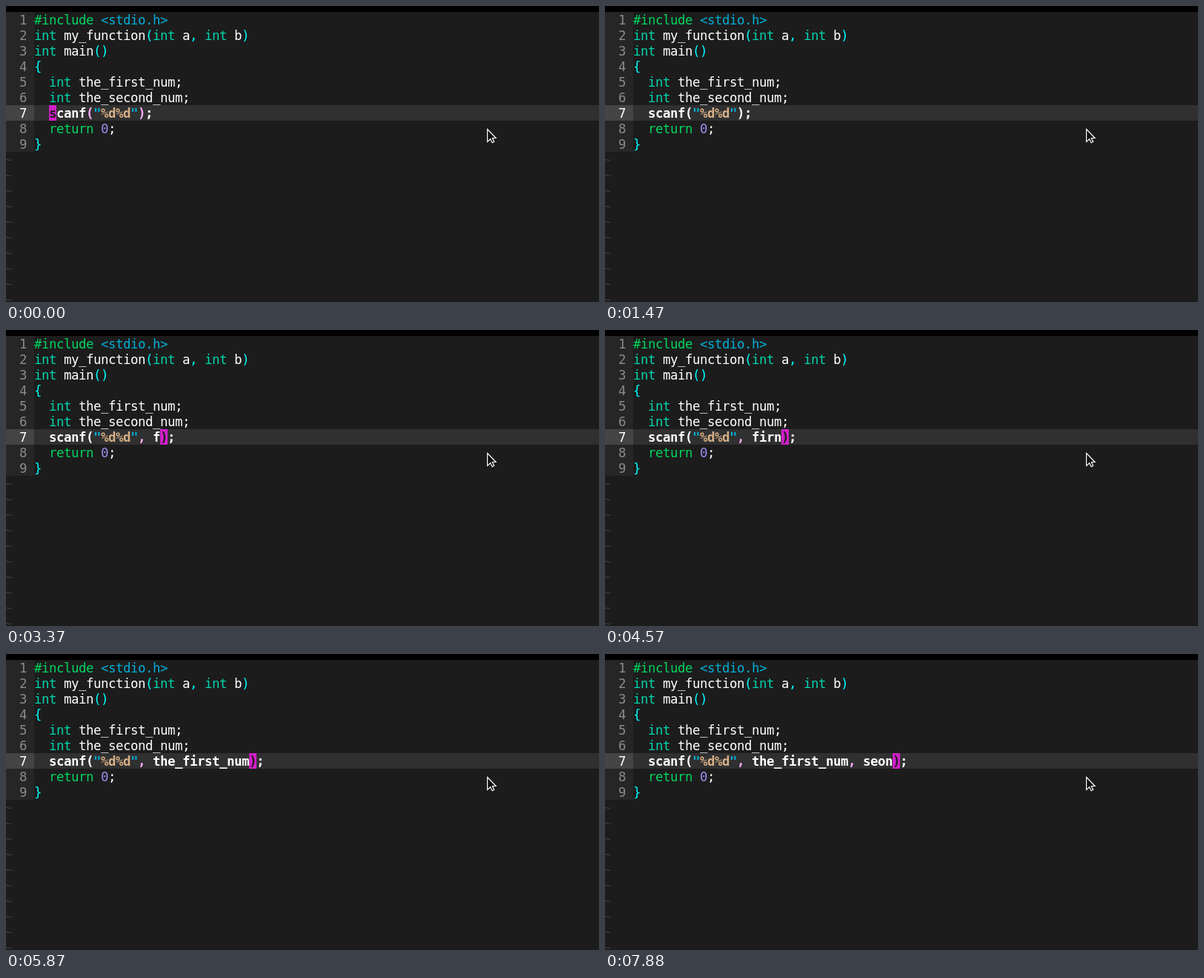
Animation, 800 px wide and 400 px high, one loop 8 s. Source, as an HTML page with a canvas:

```html
<!DOCTYPE html>
<html lang="en">
<head>
<meta charset="utf-8">
<title>Editor</title>
<style>
html, body { margin: 0; width: 100%; height: 100%; overflow: hidden; background: #1c1c1c; }
canvas { display: block; }
</style>
</head>
<body>
<canvas id="stage" width="800" height="400"></canvas>
<script>
const ctx = document.getElementById('stage').getContext('2d');
const LOOP = 8000, CELL = 10, ROW = 21, TOP = 8, LEFT = 38;
const FONT = '17.33px "DejaVu Sans Mono", monospace';
const WHITE = '#ffffff', CYAN = '#00ffff', PINK = '#ffafff';

const code = [
  '#include <stdio.h>',
  'int my_function(int a, int b)',
  'int main()',
  '{',
  '  int the_first_num;',
  '  int the_second_num;',
  '',
  '  return 0;',
  '}'
];
const ACTIVE = 6;
const HEAD = '  scanf("%d%d"';

const syntax = [
  [/^(#include|return)$/, '#00d75f'],
  [/^[<"]/, '#00afd7'],
  [/^int$/, '#00d7af'],
  [/^%d$/, '#d7af87'],
  [/^0$/, '#a08cf0'],
  [/^[(){},]$/, CYAN]
];

// Each step: start time, text inserted before the closing bracket, cursor hidden, bracket match off
const steps = [
  [810, ''], [1470, '', true], [1510, ''],
  [1740, ','], [1860, ', '],
  [3370, ', f'], [3480, ', fi'], [3960, ', fir'],
  [4570, ', firn'], [4720, ', firnu'], [4970, ', firnum'],
  [5170, ', firnum', true, true], [5210, ', my_function', true, true], [5250, ', my_function'],
  [5830, ', my_function', true], [5870, ', the_first_num'],
  [6880, ', the_first_num,'], [6930, ', the_first_num, '],
  [7210, ', the_first_num, s'], [7520, ', the_first_num, se'],
  [7800, ', the_first_num, seo'], [7880, ', the_first_num, seon']
];

function stateAt(t) {
  if (t < steps[0][0]) {
    // The cursor runs right from the first letter to the semicolon
    const moves = t < 180 ? 0 : Math.min(9, 1 + Math.floor((t - 180) / 45));
    const shift = Math.min(13, Math.floor(moves * 1.5));
    return { text: '', cursor: 2 + shift, matched: shift === 12 };
  }
  const [, text, hidden, unmatched] = steps.findLast(s => s[0] <= t);
  return { text, cursor: hidden ? -1 : HEAD.length + text.length, matched: !unmatched };
}

function rect(x, y, w, h, color) {
  ctx.fillStyle = color;
  ctx.fillRect(x, y, w, h);
}

function put(text, x, row, color) {
  ctx.fillStyle = color;
  [...text].forEach((ch, i) => ctx.fillText(ch, x + i * CELL, TOP + row * ROW + 17));
}

function drawCode(line, row, bracketColor) {
  const tokens = line.matchAll(/#include|<[^>]*>|%d|\w+|\s+|./g);
  for (const { 0: token, index } of tokens) {
    let color = (syntax.find(([rule]) => rule.test(token)) || [0, WHITE])[1];
    if (row === ACTIVE && color === CYAN) color = token === ',' ? PINK : bracketColor;
    put(token, LEFT + index * CELL, row, color);
  }
}

function drawPointer() {
  const points = [[649.5, 166.5], [649.5, 183.5], [653.5, 179.8], [656, 184.7],
    [658.5, 183.5], [656.2, 178.5], [661, 178.5]];
  ctx.beginPath();
  points.forEach(p => ctx.lineTo(...p));
  ctx.closePath();
  ctx.fillStyle = '#111';
  ctx.fill();
  ctx.strokeStyle = '#fff';
  ctx.lineWidth = 1.2;
  ctx.stroke();
}

function draw(t) {
  const { text, cursor, matched } = stateAt(t);
  const activeLine = HEAD + text + ');';
  const y = TOP + ACTIVE * ROW;

  rect(0, 0, 800, 400, '#1c1c1c');
  rect(0, 0, 800, TOP, '#000');
  rect(0, TOP, LEFT, code.length * ROW, '#262626');
  rect(0, y, LEFT, ROW, '#444');
  rect(LEFT, y, 800 - LEFT, ROW, '#303030');

  ctx.font = FONT;
  code.forEach((line, row) => {
    put(String(row + 1), 18, row, row === ACTIVE ? WHITE : '#8a8a8a');
    drawCode(line, row);
  });
  for (let row = code.length; row < 19; row++) put('~', -2, row, '#3a3a3a');

  ctx.font = 'bold ' + FONT;
  drawCode(activeLine, ACTIVE, matched ? WHITE : PINK);
  if (cursor >= 0) {
    const x = LEFT + cursor * CELL;
    rect(x, y, CELL, ROW, '#d01fc8');
    put(activeLine[cursor], x, ACTIVE, '#1c1c1c');
  }
  drawPointer();
}

function frame() {
  draw(performance.now() % LOOP);
  requestAnimationFrame(frame);
}
frame();
</script>
</body>
</html>
```
